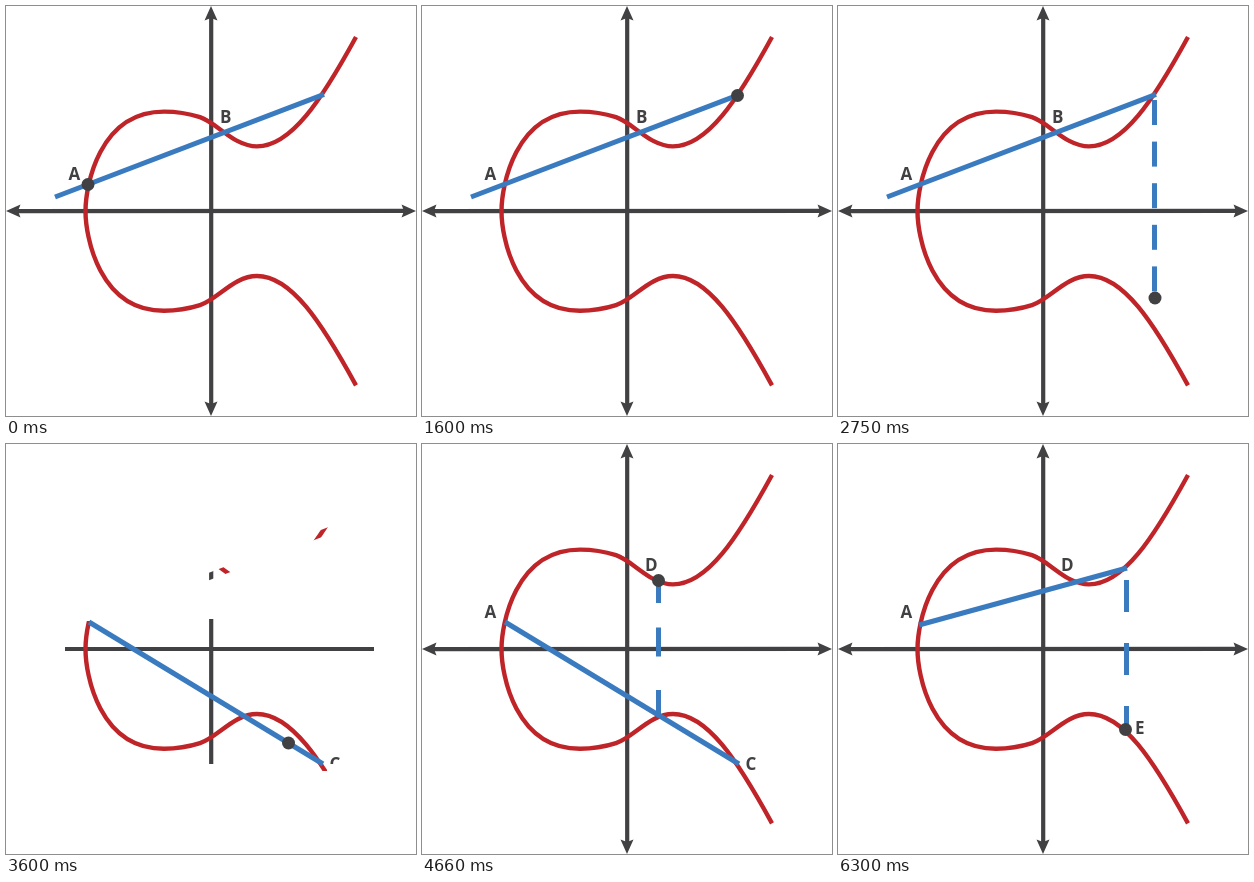
Write an HTML page with a canvas that moves like this. It is 410x410 px and loops after 8.23 s.

```html
<!DOCTYPE html>
<html lang="en">
<head>
<meta charset="utf-8">
<title>Adding points on an elliptic curve</title>
<style>
  html, body { margin: 0; width: 100%; height: 100%; overflow: hidden; background: #fff; }
  canvas { display: block; width: 410px; height: 410px; }
</style>
</head>
<body>
<canvas id="stage" width="410" height="410"></canvas>
<script>
const ctx = document.getElementById('stage').getContext('2d');
const LOOP = 8230, DARK = '#414042', RED = '#bf2428', BLUE = '#3a7bc0';

// Dot travel: start time, step length, step count, end point
const START = [82, 178.5];
const MOVES = [
  [200, 70, 21, 315.5, 89.5],
  [1700, 70, 16, 317, 292],
  [2820, 50, 5, 317, 320],
  [3460, 70, 7, 236.5, 271],
  [4050, 55.4, 12, 236.5, 136.5],
  [5130, 50, 5, 288, 124],
  [5400, 70, 6, 287.5, 185],
  [5820, 70, 5, 287.5, 240.5],
  [6150, 50, 4, 287.5, 285.5]
];

const LINE_AB = [49, 191, 318, 88.4];
const LINE_AC = [83, 178, 317, 320];
const LINE_AD = [81, 181, 289, 124];

const LABELS = {
  A: [62.5, 174], B: [214, 117], C: [323.5, 325.5], D: [223, 127], E: [297, 290]
};

const half = new Path2D(
  'M79.5 205.2 C79.5 180 93 105.6 158 105.6 C170 105.6 184 108 194 111.2 ' +
  'C212 117.4 228 140.4 251 140.4 C285 140.4 315 95 350 31');
const curve = new Path2D(half);
curve.addPath(half, new DOMMatrix([1, 0, 0, -1, 0, 410.4]));

function dotAt(t) {
  let [x, y] = START;
  for (const [start, step, count, ex, ey] of MOVES) {
    if (t < start) break;
    const p = Math.min(count, Math.floor((t - start) / step + 1e-6) + 1) / count;
    x += (ex - x) * p;
    y += (ey - y) * p;
  }
  return [x, y];
}

function line(x1, y1, x2, y2, color, width) {
  ctx.strokeStyle = color;
  ctx.lineWidth = width;
  ctx.beginPath();
  ctx.moveTo(x1, y1);
  ctx.lineTo(x2, y2);
  ctx.stroke();
}

function clipped(points, draw) {
  ctx.save();
  ctx.beginPath();
  points.forEach(([x, y]) => ctx.lineTo(x, y));
  ctx.clip();
  draw();
  ctx.restore();
}

const box = (x1, y1, x2, y2) => [[x1, y1], [x2, y1], [x2, y2], [x1, y2]];

function drawCurve() {
  ctx.strokeStyle = RED;
  ctx.lineWidth = 4.4;
  ctx.stroke(curve);
}

function drawAxes() {
  line(8, 205.2, 402, 204.8, DARK, 4.2);
  line(205.2, 8, 205.2, 402, DARK, 4.2);
  ctx.fillStyle = DARK;
  for (let i = 0; i < 4; i++) {
    ctx.save();
    ctx.translate(205, 205);
    ctx.rotate(i * Math.PI / 2);
    ctx.beginPath();
    ctx.moveTo(205, 0);
    ctx.lineTo(190.5, -6.5);
    ctx.lineTo(193, 0);
    ctx.lineTo(190.5, 6.5);
    ctx.fill();
    ctx.restore();
  }
}

function drawLabel(name) {
  ctx.fillStyle = DARK;
  ctx.font = '700 17px "Open Sans", "Noto Sans", sans-serif';
  ctx.fillText(name, ...LABELS[name]);
}

// Vertical dashes, shown only between the two limits
function drawDashes(x, first, length, period, top, bottom) {
  for (let y = first; y < bottom; y += period) {
    const a = Math.max(y, top), b = Math.min(y + length, bottom);
    if (b > a) line(x, a, x, b, BLUE, 5);
  }
}

// Bare middle part of the diagram, with scraps left where the first line ran
function drawScraps() {
  line(59, 205, 368, 205, DARK, 4.2);
  line(205.2, 175, 205.2, 320, DARK, 4.2);
  clipped(box(70, 177, 321, 327), drawCurve);
  const [x1, y1, x2, y2] = LINE_AB, slope = (y2 - y1) / (x2 - x1);
  const yAt = x => y1 + (x - x1) * slope;
  const strip = [[150, yAt(150) - 3.6], [322, yAt(322) - 3.6],
                 [322, yAt(322) + 4], [150, yAt(150) + 4]];
  clipped(strip, () => {
    line(205.2, 100, 205.2, 160, DARK, 4.2);
    drawCurve();
  });
  clipped(box(323, 311, 335, 320), () => drawLabel('C'));
}

function draw(t) {
  const [x, y] = dotAt(t);
  const bare = t >= 3460 && t < 4050;
  ctx.fillStyle = '#fff';
  ctx.fillRect(0, 0, 410, 410);

  if (bare) {
    drawScraps();
  } else {
    drawAxes();
    drawCurve();
  }

  const chord = t < 3290 ? LINE_AB : t < 4930 ? LINE_AC : LINE_AD;
  line(...chord, BLUE, 5);

  if (t >= 1700 && t < 3290) drawDashes(316.5, 94, 25, 41.6, 89, y);
  if (t >= 4050 && t < 4930) drawDashes(236.5, 121, 38, 62.5, y, 159);
  if (t >= 4050 && t < 4930) drawDashes(236.5, 183.5, 29, 62.5, y, 271);
  if (t >= 5400) drawDashes(288.5, 136, 32, 63, 124, y);

  ctx.fillStyle = DARK;
  ctx.beginPath();
  ctx.arc(x, y, 6.5, 0, 7);
  ctx.fill();

  if (bare) return;
  drawLabel('A');
  if (t < 3290) drawLabel('B');
  if (t >= 3020 && t < 4930) drawLabel('C');
  if (t >= 4660) drawLabel('D');
  if (t >= 6300) drawLabel('E');
}

const begin = performance.now();
function tick() {
  draw((performance.now() - begin) % LOOP);
  requestAnimationFrame(tick);
}
tick();
</script>
</body>
</html>
```
